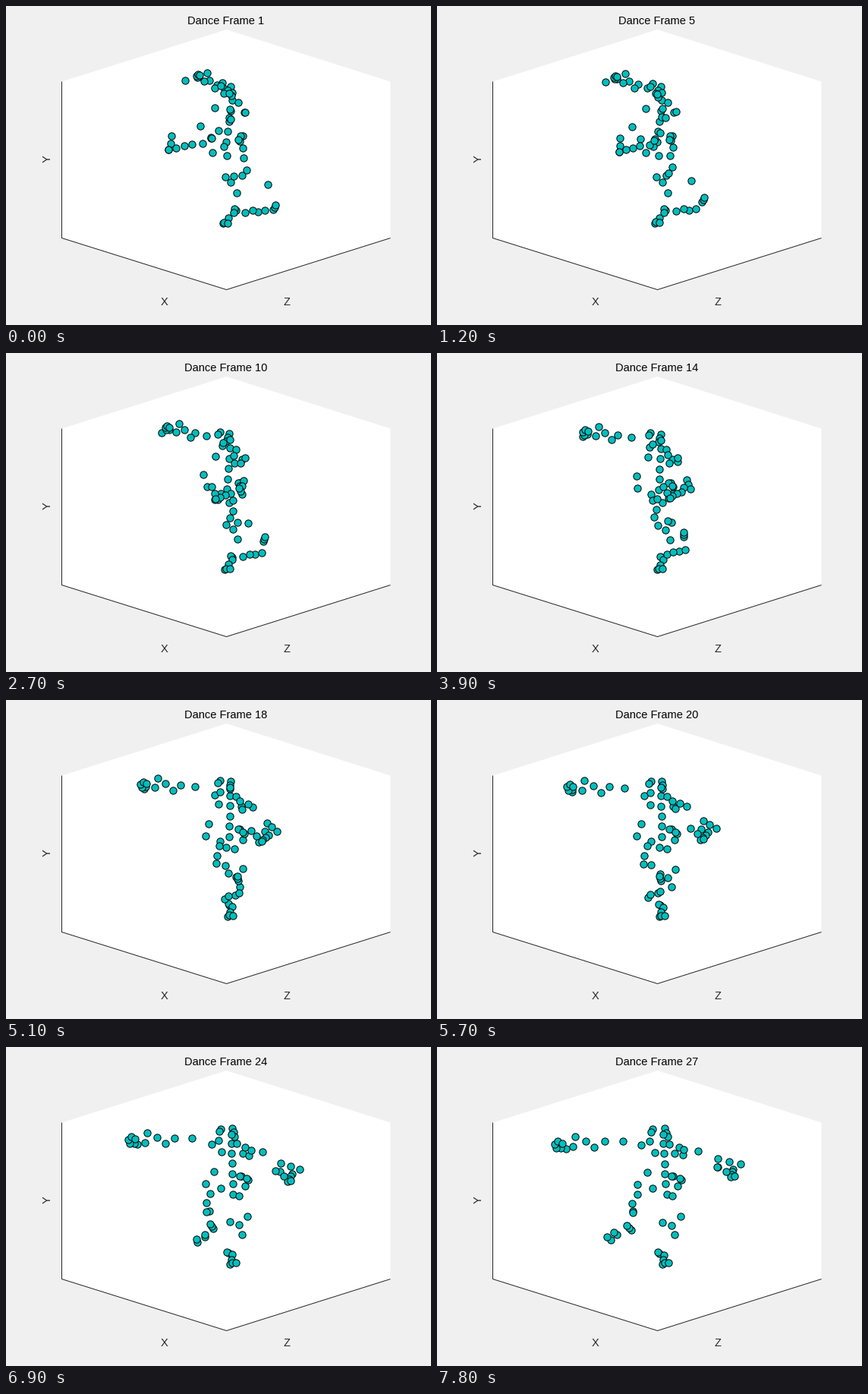
A matplotlib script for the animation above (8 s loop, 560 px wide and 420 px high).

```python
import numpy as np
import matplotlib.pyplot as plt
from matplotlib.animation import FuncAnimation
from matplotlib.patches import Polygon

WIDTH, HEIGHT, DPI = 560, 420, 100
TICK_MS, TICKS, TICKS_PER_POSE = 100, 80, 3
LAST_POSE = 26
PX = 72 / DPI
INK = "#262626"


# A marker is (x, y, x, y): where it stands in the opening and the closing pose.
def bone(count, a, b):
    """Markers spread evenly from joint a to joint b."""
    return np.linspace(a, b, count)


def cluster(count, centre, opening_r, closing_r, turn=0.0):
    """Markers on a small circle that may open up during the dance."""
    angle = turn + 2 * np.pi * np.arange(count) / count
    x, y = np.cos(angle), np.sin(angle)
    return np.array(centre) + np.c_[opening_r * x, opening_r * y,
                                    closing_r * x, closing_r * y]


class Part:
    """Markers that travel with one arc (bend) and one horizontal easing."""

    def __init__(self, *groups, bend=(0, 0), power=1.0):
        self.opening, self.closing = np.hsplit(np.vstack(groups), 2)
        self.bend = np.array(bend)
        self.power = np.array([power, 1])

    def at(self, u):
        travel = (self.closing - self.opening) * u ** self.power
        return self.opening + travel + self.bend * 4 * u * (1 - u)


left_arm = Part(
    bone(3, (288, 109, 245, 124), (268, 98, 196, 124)),
    bone(2, (275, 108, 207, 132), (261, 99, 179, 131)),
    bone(2, (265, 88, 182, 118), (236, 98, 170, 134)),
    cluster(5, (253, 92, 160, 129), 2, 5, turn=0.84),
    bend=(-11, -6))

right_arm = Part(
    bone(3, (280, 164, 370, 147), (259, 181, 400, 154)),
    bone(2, (271, 174, 370, 158), (218, 171, 369, 158)),
    bone(4, (245, 182, 390, 161), (214, 189, 387, 171)),
    bone(2, (217, 181, 381, 164), (214, 189, 392, 170)),
    bend=(4, 11))

trunk = Part(
    # spine
    bone(5, (298, 124, 298, 127), (290, 179, 301, 180)),
    # head and neck
    cluster(2, (284, 103, 283, 110), 2.3, 2, turn=-0.9),
    bone(3, (296, 106, 300, 107), (287, 115, 304, 118)),
    bone(3, (298, 114, 298, 115), (314, 140, 313, 140)),
    # shoulders and chest
    bone(2, (297, 118, 269, 129), (294, 115, 280, 124)),
    bone(2, (295, 136, 319, 132), (294, 147, 324, 142)),
    bone(2, (296, 149, 344, 137), (315, 140, 325, 135)),
    bone(2, (275, 134, 287, 139), (287, 185, 284, 186)),
    # waist and hips
    bone(2, (256, 158, 277, 165), (270, 174, 264, 181)),
    bone(2, (272, 193, 303, 194), (291, 197, 310, 196)),
    bone(1, (312, 187, 317, 183), (312, 187, 317, 183)),
    cluster(2, (310, 171, 310, 170), 1.5, 1),
    cluster(2, (307, 177, 321, 174), 1, 1.3, turn=0.7),
    bend=(-3.5, 0))

standing_leg = Part(
    bone(2, (289, 225, 297, 231), (296, 232, 309, 235)),
    bone(2, (300, 224, 321, 223), (304, 246, 313, 247)),
    cluster(2, (302, 268, 292, 271), 1.2, 1.2, turn=0.7),
    bone(3, (300, 272, 299, 274), (286, 286, 297, 286)),
    bone(2, (287, 285, 300, 284), (292, 286, 305, 284)),
    bend=(-2, -1))

swinging_thigh = Part(
    bone(2, (345, 235, 258, 216), (311, 223, 258, 218)),
    bone(2, (317, 216, 257, 206), (313, 200, 264, 194)),
    bend=(0, -5), power=1.1)

swinging_ankle = Part(
    bone(3, (352, 268, 256, 241), (355, 262, 250, 235)),
    bend=(0, -13), power=1.83)

swinging_foot = Part(
    bone(2, (315, 272, 229, 254), (332, 271, 237, 247)),
    bone(2, (325, 269, 224, 250), (341, 269, 233, 244)),
    bend=(0, 2), power=2.9)

parts = [left_arm, trunk, right_arm, standing_leg,
         swinging_thigh, swinging_ankle, swinging_foot]


def progress(pose):
    """Dance progress 0..1, a little slow at both ends."""
    u = pose / LAST_POSE
    return u - 0.02 * np.sin(2 * np.pi * u)


fig = plt.figure(figsize=(WIDTH / DPI, HEIGHT / DPI), dpi=DPI, facecolor="#f0f0f0")
ax = fig.add_axes([0, 0, 1, 1])
ax.set(xlim=(0, WIDTH), ylim=(HEIGHT, 0))
ax.axis("off")

walls = [(73.5, 99.5), (290.5, 31), (506.5, 99.5),
         (506.5, 305.5), (290.5, 373.5), (73.5, 305.5)]
ax.add_patch(Polygon(walls, facecolor="white", edgecolor="none"))
edges = np.array([walls[0], walls[5], walls[4], walls[3]])
ax.plot(*edges.T, color=INK, lw=PX, solid_capstyle="butt")


def label(x, y, text, color=INK, **kwargs):
    style = dict(ha="center", va="baseline", family="Liberation Sans",
                 fontsize=14.67 * PX, color=color)
    return ax.text(x, y, text, **{**style, **kwargs})


label(209, 394, "X")
label(370.5, 394, "Z")
label(55, 201.5, "Y", rotation=90, va="center")
title = label(290, 24, "", color="black")
dots, = ax.plot([], [], "o", ms=9.3 * PX, mfc="#00bfbf", mec="black", mew=PX)


def draw(tick):
    pose = tick // TICKS_PER_POSE
    u = progress(pose)
    dots.set_data(*np.vstack([part.at(u) for part in parts]).T)
    title.set_text(f"Dance Frame {pose + 1}")
    return dots, title


animation = FuncAnimation(fig, draw, frames=TICKS, interval=TICK_MS,
                          repeat=True, repeat_delay=0)
plt.show()
```
